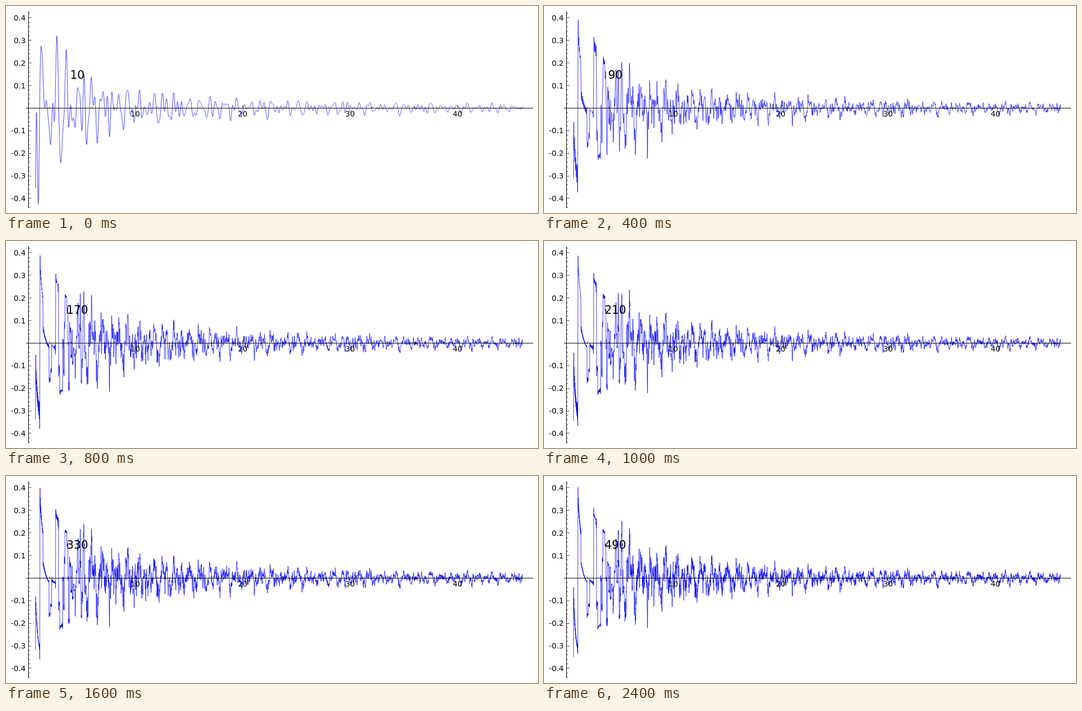
An HTML page that plays this animation: 983x384 px, repeating every 2600 ms.

```html
<!DOCTYPE html>
<html lang="en">
<head>
<meta charset="utf-8">
<title>Oscillatory term</title>
<style>
  html, body { margin: 0; width: 100%; height: 100%; overflow: hidden; background: #fff; }
  svg { display: block; width: 983px; height: 384px; }
  text { font: 13.9px "DejaVu Sans", sans-serif; fill: #000; }
  #count { font-size: 20.83px; text-anchor: middle; }
  #curve { fill: none; stroke: #00f; stroke-width: .75; stroke-linejoin: round; }
  .axis { stroke: #000; stroke-width: 1; }
  .tick { stroke: #000; stroke-width: .7; }
</style>
</head>
<body>
<svg viewBox="0 0 983 384">
  <path id="curve"/>
  <g id="axes"></g>
  <text id="count" x="131.8" y="135.3"></text>
</svg>
<script>
const STEP = 200, FIRST = 10, MORE = 40, FRAMES = 13;
const ZEROS = FIRST + MORE * (FRAMES - 1);
const px = x => 40.8 + 19.85 * x;
const py = y => 189.4 - 418.75 * y;

// Coefficients of q * prod (1-q^n)(1-q^2n)(1-q^7n)(1-q^14n), the level 14 cusp form
function cuspForm(size) {
  const a = new Float64Array(size);
  a[1] = 1;
  for (const m of [1, 2, 7, 14])
    for (let k = m; k < size; k += m)
      for (let i = size - 1; i >= k; i--) a[i] -= a[i - k];
  return a;
}

// Zeros of its L-function on the critical line, from a Mellin integral
// along a ray tilted almost to the real axis, which offsets the gamma decay
function findZeros(count) {
  const a = cuspForm(500), c = 2 * Math.PI / Math.sqrt(14);
  const tilt = 0.04, s = Math.sin(tilt), k = Math.cos(tilt);
  const h = 2 * Math.PI / 500, dt = 0.01, cut = 32;
  const re = [], im = [], rc = [], rs = [];
  for (let j = 0; c * s * Math.exp(j * h) < cut; j++) {
    const r = Math.exp(j * h);
    let x = 0, y = 0;
    for (let n = 1; n < a.length && c * n * r * s < cut; n++) {
      if (!a[n]) continue;
      const mag = a[n] * Math.exp(-c * n * r * s), ph = c * n * r * k;
      x += mag * Math.cos(ph);
      y -= mag * Math.sin(ph);
    }
    const w = j ? r : r / 2;
    re.push(w * (x * s - y * k));
    im.push(w * (y * s + x * k));
    rc.push(Math.cos(j * h * dt));
    rs.push(Math.sin(j * h * dt));
  }
  const zeros = [];
  let last = 0;
  for (let i = 0; zeros.length < count && i * dt < 380; i++) {
    let v = 0;
    for (let j = 0; j < re.length; j++) {
      const x = re[j], y = im[j];
      v += x;
      re[j] = x * rc[j] - y * rs[j];
      im[j] = x * rs[j] + y * rc[j];
    }
    if (i && v * last < 0) zeros.push((i - v / (v - last)) * dt);
    last = v;
  }
  return zeros;
}

// Partial sums (2/x) * sum sin(g x)/g for x from log 2 to log 10^20
function buildCurves() {
  const size = 6369, x0 = Math.log(2), dx = (20 * Math.log(10) - x0) / (size - 1);
  const sum = new Float64Array(size), curves = [];
  findZeros(ZEROS).forEach((g, i) => {
    const c = Math.cos(g * dx), s = Math.sin(g * dx);
    let x = Math.cos(g * x0) * 2 / g, y = Math.sin(g * x0) * 2 / g;
    for (let j = 0; j < size; j++) {
      sum[j] += y;
      const t = x * c - y * s;
      y = x * s + y * c;
      x = t;
    }
    if ((i + 1 - FIRST) % MORE === 0) {
      const pts = Array.from(sum, (v, j) => {
        const u = x0 + j * dx;
        return px(u).toFixed(2) + " " + py(v / u).toFixed(2);
      });
      curves.push("M" + pts.join("L"));
    }
  });
  return curves;
}

function drawAxes() {
  const out = [];
  const line = (cls, x1, y1, x2, y2) =>
    out.push(`<line class="${cls}" x1="${x1}" y1="${y1}" x2="${x2}" y2="${y2}"/>`);
  const label = (x, y, anchor, t) =>
    out.push(`<text x="${x}" y="${y}" text-anchor="${anchor}">${t}</text>`);
  line("axis", 37, 189.5, 974, 189.5);
  line("axis", 41.5, 10, 41.5, 375);
  for (let v = 2; v <= 46; v += 2) {
    const x = Math.floor(px(v)) + 0.5, major = v % 10 === 0;
    line("tick", x, 189.5, x, major ? 184 : 186.7);
    if (major) label(px(v) - 0.5, 205, "middle", v);
  }
  for (let i = -22; i <= 21; i++) {
    if (!i) continue;
    const yv = py(i / 50), y = Math.floor(yv) + 0.5, major = i % 5 === 0;
    line("tick", 41.5, y, major ? 47 : 44.3, y);
    if (major) label(36.3, Math.round(yv + 5), "end", (i / 50).toFixed(1));
  }
  document.getElementById("axes").innerHTML = out.join("");
}

drawAxes();
const curves = buildCurves();
const curve = document.getElementById("curve");
const count = document.getElementById("count");
let shown = -1;

function show(t) {
  const i = Math.floor(t / STEP) % FRAMES;
  if (i === shown) return;
  shown = i;
  curve.setAttribute("d", curves[i] || "");
  count.textContent = FIRST + MORE * i;
}

const start = performance.now();
function tick() {
  show(performance.now() - start);
  requestAnimationFrame(tick);
}
tick();
</script>
</body>
</html>
```
